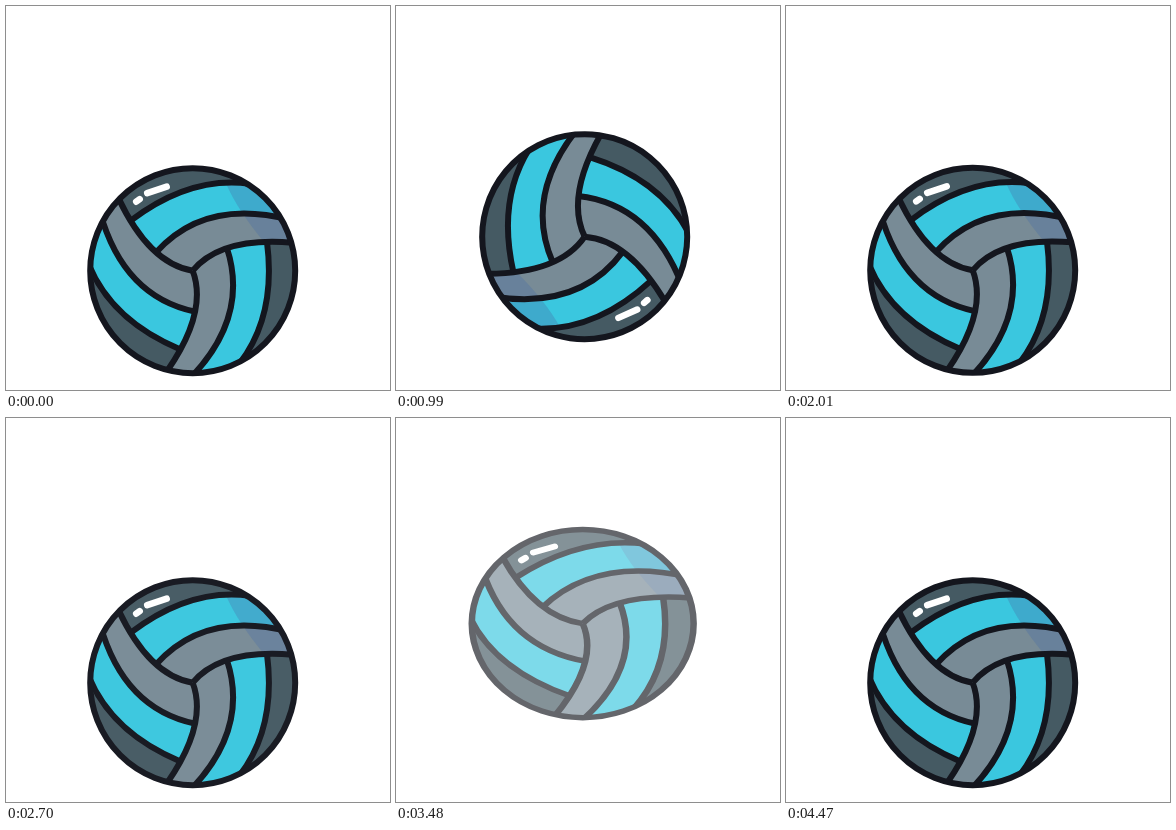
An HTML page for the animation above (4500 ms loop, 384 px wide and 384 px high).

```html
<!DOCTYPE html>
<html>
<head>
<meta charset="utf-8">
<style>
html, body { margin: 0; width: 100%; height: 100%; overflow: hidden; background: #fff; }
svg { display: block; width: 100vw; height: 100vh; }
</style>
</head>
<body>
<svg viewBox="0 0 384 384">
  <defs>
    <clipPath id="round"><circle r="103"/></clipPath>
    <g id="bands">
      <path fill="#3ac7df" d="M-62-50Q-3-95 57-87L112-56 93-52Q12-73-37-18Z"/>
      <path fill="#788b96" d="M-37-18Q12-73 93-52L112-50V-27L97-28Q28-34 0 0Z"/>
    </g>
    <path id="seams" d="M-62-50Q-3-95 57-87M-37-18Q12-73 97-51M0 0Q28-34 100-28"/>
  </defs>
  <g id="ball">
    <g clip-path="url(#round)">
      <circle r="103" fill="#455a63"/>
      <use href="#bands"/>
      <use href="#bands" transform="rotate(120)"/>
      <use href="#bands" transform="rotate(240)"/>
      <path fill="#466ea5" opacity=".33" d="M33-88Q45-60 72-28H110V-50L57-87Z"/>
      <g fill="none" stroke="#14161e" stroke-width="6">
        <use href="#seams"/>
        <use href="#seams" transform="rotate(120)"/>
        <use href="#seams" transform="rotate(240)"/>
      </g>
    </g>
    <circle r="102.5" fill="none" stroke="#14161e" stroke-width="6"/>
    <path d="M-45.5-77.5L-26-84M-56.5-69L-53-71.5" stroke="#fff" stroke-width="6.5" stroke-linecap="round"/>
  </g>
</svg>
<script>
const ball = document.getElementById('ball');
const LOOP = 4500;

const progress = (t, from, to) => Math.min(1, Math.max(0, (t - from) / (to - from)));
const smooth = (t, from, to) => {
  const u = progress(t, from, to);
  return u * u * (3 - 2 * u);
};
const quint = u => u < .5 ? 16 * u ** 5 : 1 - 16 * (1 - u) ** 5;

function pose(t) {
  if (t < 3200) {
    // Spinning hop, then fade out
    const angle = 360 * quint(progress(t, 0, 1994));
    return {
      angle,
      x: 1 - Math.cos(angle * Math.PI / 180),
      y: -64 * (smooth(t, 540, 1405) - smooth(t, 1405, 2040)),
      stretch: 1,
      alpha: 1 - smooth(t, 2670, 3000)
    };
  }
  // Drop in and bounce once
  return {
    angle: 0,
    x: 0,
    y: -126 * (1 - smooth(t, 3330, 3620)) - 45 * (smooth(t, 3790, 4110) - smooth(t, 4110, 4430)),
    stretch: 1.104 - .199 * smooth(t, 3440, 3640) + .152 * smooth(t, 3700, 4110) - .057 * smooth(t, 4110, 4430),
    alpha: progress(t, 3340, 3555)
  };
}

function draw() {
  const p = pose(performance.now() % LOOP);
  ball.setAttribute('transform',
    `translate(${186.7 + p.x} ${264.7 + p.y}) scale(${p.stretch} ${2 - p.stretch}) rotate(${p.angle})`);
  ball.setAttribute('opacity', p.alpha);
  requestAnimationFrame(draw);
}
draw();
</script>
</body>
</html>
```
